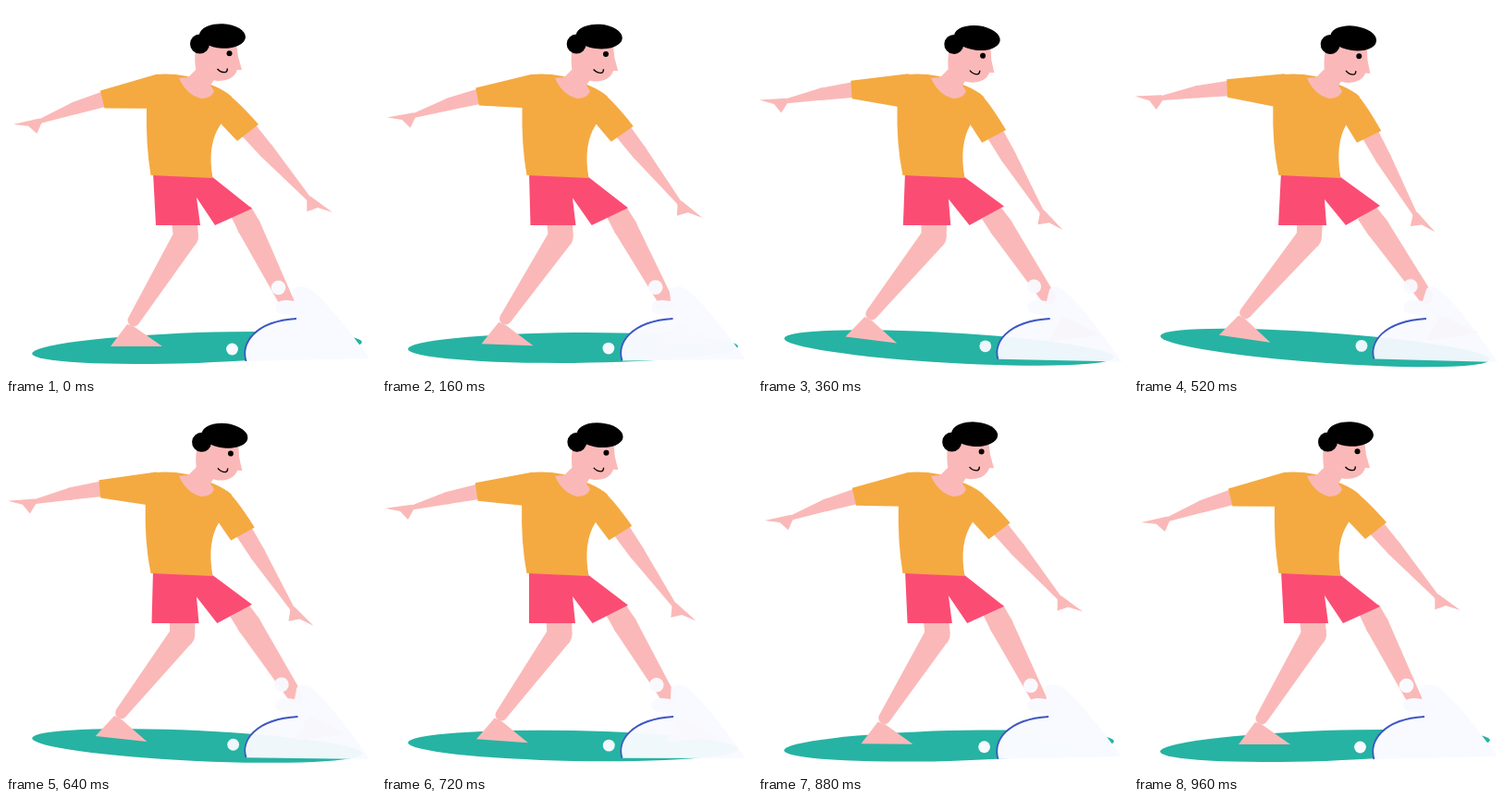
An HTML page with a canvas that plays this animation: 400 px wide and 400 px high, repeating every 1000 ms.

```html
<!DOCTYPE html>
<html lang="en">
<head>
<meta charset="utf-8">
<title>Surfer</title>
<style>
  html, body { margin: 0; width: 100%; height: 100%; overflow: hidden; background: #fff; }
  canvas { display: block; width: 100vw; height: 100vh; }
</style>
</head>
<body>
<canvas id="stage" width="400" height="400"></canvas>
<script>
const ctx = document.getElementById('stage').getContext('2d');
const SKIN = '#fab9b8', SHIRT = '#f4aa41', SHORTS = '#fb4d74';
const BOARD = '#26b3a3', FOAM = '#f8faff', LINE = '#3d56c5';
const STEP = 40, LOOP = 1000, SWING = 960;

const mix = (a, b, p) => a + (b - a) * p;
const joint = (x, y, r) => ({ x, y, r });

function fill(color, d) {
  ctx.fillStyle = color;
  ctx.fill(new Path2D(d));
}

function stroke(color, width, d) {
  ctx.strokeStyle = color;
  ctx.lineWidth = width;
  ctx.stroke(new Path2D(d));
}

function oval(color, x, y, rx, ry = rx, tilt = 0) {
  ctx.fillStyle = color;
  ctx.beginPath();
  ctx.ellipse(x, y, rx, ry, tilt * Math.PI / 180, 0, 7);
  ctx.fill();
}

function turned(x, y, deg, draw) {
  ctx.save();
  ctx.translate(x, y);
  ctx.rotate(deg * Math.PI / 180);
  ctx.translate(-x, -y);
  draw();
  ctx.restore();
}

// Tapered segment with a round end
function bone(a, b) {
  const dir = Math.atan2(b.y - a.y, b.x - a.x);
  const nx = -Math.sin(dir), ny = Math.cos(dir);
  ctx.fillStyle = SKIN;
  ctx.beginPath();
  for (const [j, s] of [[a, 1], [a, -1], [b, -1], [b, 1]]) {
    ctx.lineTo(j.x + nx * j.r * s, j.y + ny * j.r * s);
  }
  ctx.fill();
  oval(SKIN, b.x, b.y, b.r);
}

function limb(root, middle, end) {
  bone(root, middle);
  bone(middle, end);
}

function foot(x, y) {
  fill(SKIN, `M${x} ${y}l-18 24h56l-30 -21Z`);
}

function hand(x, y, deg, flip) {
  ctx.save();
  ctx.translate(x, y);
  ctx.rotate(deg * Math.PI / 180);
  ctx.scale(1, flip);
  fill(SKIN, 'M0 -2.5L29 0L13 4L5 13.5L-2 2Z');
  ctx.restore();
}

function legs(p) {
  turned(188, 214, 8.3 * p, () => {
    limb(joint(192, 226, 14), joint(194.5, 249, 13.5), joint(138, 340, 6.5));
    foot(131, 344);
  });
  turned(263, 239, -8.4 * p, () => {
    limb(joint(254, 222, 12), joint(263, 239, 12.7), joint(304, 321, 8));
    foot(316, 344);
  });
  fill(SHORTS, `M159 180L${162 - 6 * p} 237H${210 - 2 * p}L206 ${207 + 2 * p}` +
    `L${226 + 3 * p} 237L266 ${219 - 3 * p}L222 184Z`);
}

function arms(p) {
  turned(166, 76, 11 * p, () => {
    limb(joint(110, 99.5, 8.5), joint(74, 110.5, 6.7), joint(37, 124.5, 2.5));
    hand(36.5, 124, 172, -1);
    fill(SHIRT, 'M102 91.5L162 74L190 90L185 111L106.5 110.5Z');
  });
  turned(237, 104, 12.2 * p, () => {
    limb(joint(262, 134, 9.5), joint(281, 156, 8.5), joint(327, 208, 2.5));
    hand(328, 208, 31, 1);
    fill(SHIRT, 'M238 94Q250 102 273 128L250 146L232 127L222 100Z');
  });
}

function body(p) {
  const side = mix(152, 150.3, p), pit = mix(232, 229.5, p);
  fill(SHIRT, `M162 74Q178 72.5 196 76L224 86Q236 91 244 98L${pit} 128` +
    `Q217 150 223.5 186L156.5 183Q${side - 1} 150 ${side} 109Z`);
}

function head(p) {
  fill(SKIN, 'M187 78L197 77L208 66L226 78L221 86L225 92Q222 100 211 100Q195 96 187 78Z');
  turned(205, 76, 4.5 * p, () => {
    fill(SKIN, 'M205 45L249 40L251 55L255 69L250 69Q246 81 229 81Q219 80 215 75L206 72Q203 60 205 45Z');
    oval('#000', 209.5, 41, 10.5);
    oval('#000', 234, 32.5, 25, 13.3, 3);
    oval('#000', 241.5, 51.3, 3);
    stroke('#000', 1.3, 'M228.5 68Q232 72 237 71.7Q239.5 71 239.3 67.5');
  });
}

function wave(p) {
  const left = mix(384, 381.5, p), right = mix(381, 385, p);
  ctx.globalAlpha = 1 - 0.06 * p;
  fill(FOAM, `M260 ${left}C254 366 268 340 315 338Q306 333 298 333Q291 331 291 325` +
    `Q292 318 303 318L312 319L${mix(309, 316, p)} 307Q319 300 329 306Q350 322 393 ${right}Z`);
  oval(FOAM, mix(294.5, 299, p), mix(304.5, 303, p), 7.8);
  oval(FOAM, mix(244.5, 246, p), mix(371, 367.3, p), 6.4);
  ctx.globalAlpha = 1;
  stroke(LINE, 1.8, `M259.5 ${left}C254 365 268 341 ${mix(314, 316, p)} 338`);
}

function draw(ms) {
  const t = Math.floor(ms % LOOP / STEP) * STEP;
  const p = (1 - Math.cos(2 * Math.PI * t / SWING)) / 2;
  ctx.fillStyle = '#fff';
  ctx.fillRect(0, 0, 400, 400);
  oval(BOARD, 206.5, 369.5, 178.5, 16.4, mix(-2, 4.2, p));
  legs(p);
  arms(p);
  body(p);
  head(p);
  wave(p);
}

const start = performance.now();
function tick() {
  draw(performance.now() - start);
  requestAnimationFrame(tick);
}
tick();
</script>
</body>
</html>
```
